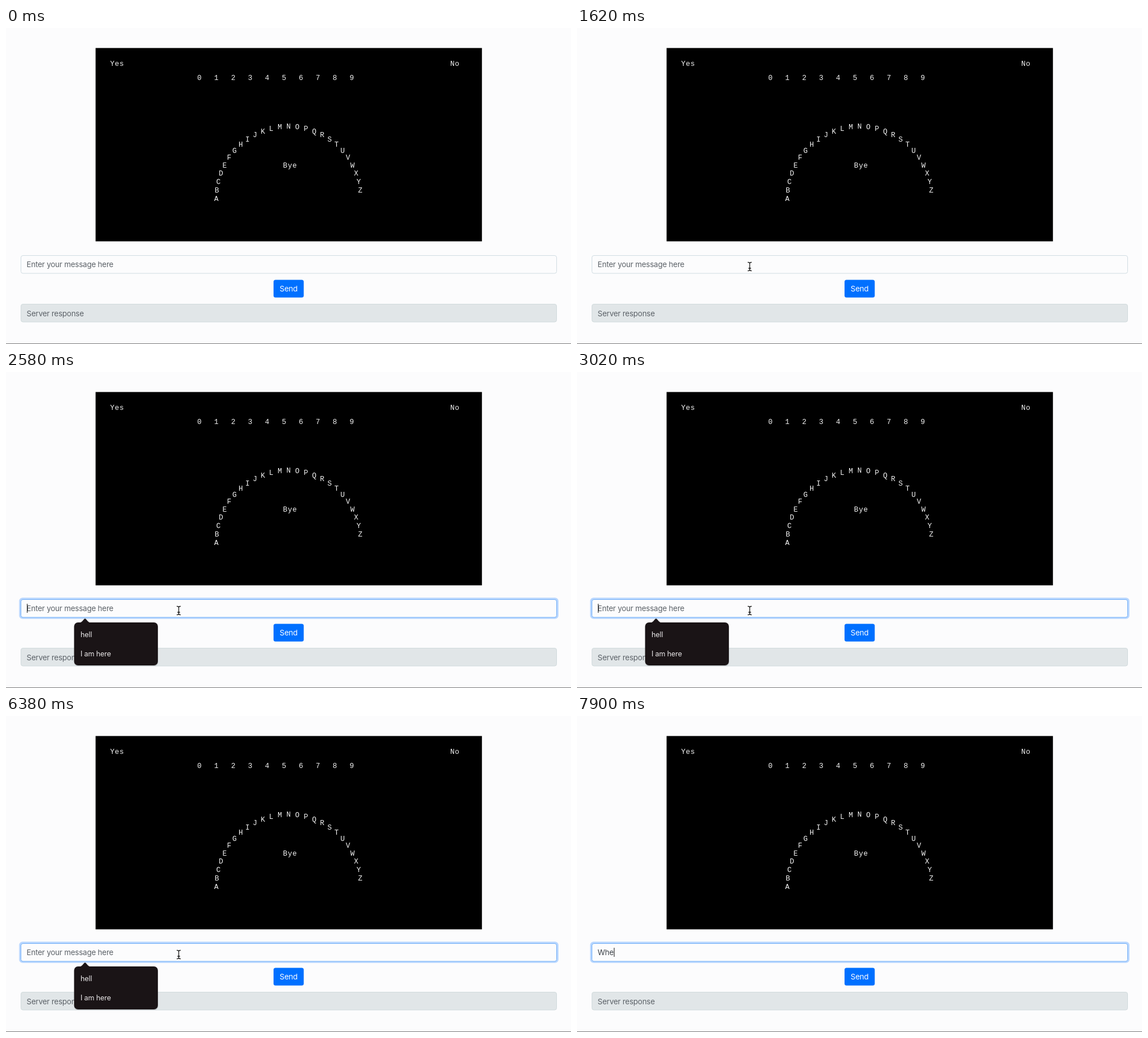
These frames come from a looping animation (1001x559 px, 8000 ms). An HTML page:

```html
<!DOCTYPE html>
<html lang="en">
<head>
<meta charset="utf-8">
<title>Spirit board</title>
<style>
  html, body { margin: 0; width: 100%; height: 100%; overflow: hidden; background: #fcfcfd; }
  svg { display: block; width: 1001px; height: 559px; }
  text { white-space: pre; }
  .ui { font: 13.4px Inter, sans-serif; letter-spacing: -.2px; fill: #5b6167; }
  .menu { font: 12.6px Inter, sans-serif; letter-spacing: -.15px; fill: #ebe9ea; }
  .board { font: 12.8px "Liberation Mono", monospace; letter-spacing: .66px; fill: #f4f4f4; }
  .mid { text-anchor: middle; letter-spacing: 0; }
</style>
</head>
<body>
<svg viewBox="0 0 1001 559">
  <rect width="1001" height="559" fill="#fcfcfd"/>
  <rect y="558" width="1001" height="1" fill="#777"/>
  <rect x="158.7" y="35.4" width="684.5" height="342" fill="#000"/>
  <g id="board" class="board">
    <text x="184.4" y="66.6">Yes</text>
    <text x="787" y="66.6">No</text>
    <text x="490.8" y="246.5">Bye</text>
  </g>

  <rect id="glow" x="23.2" y="399.2" width="955.6" height="37.6" rx="6" fill="#b9d7ff"/>
  <rect id="field" x="26.5" y="402.5" width="949" height="31.5" rx="3.5" fill="#fcfcfd"/>
  <text id="hint" class="ui" x="36.6" y="423.2">Enter your message here</text>
  <text id="typed" class="ui" x="36.6" y="423.2" style="fill:#3e444a"></text>
  <rect id="caret" y="410" width="1.1" height="16" fill="#222"/>

  <rect x="474" y="445.5" width="53.5" height="31.3" rx="3.6" fill="#0070ff"/>
  <text class="ui" x="484.8" y="465.9" style="fill:#fff">Send</text>
  <rect x="26.5" y="488.5" width="949" height="31.5" rx="3.5" fill="#e1e6e8" stroke="#d0dadc"/>
  <text class="ui" x="36.6" y="509.8">Server response</text>

  <g id="menu">
    <rect x="120" y="443" width="150" height="77.5" rx="8" fill="#000" opacity=".12"/>
    <path d="M130 443.5 Q133 443 135 441 L138.5 437 Q140 435.4 141.5 437 L145 441 Q147 443 150 443.5Z" fill="#1a1416"/>
    <rect x="120.7" y="443" width="148.3" height="76" rx="7" fill="#1a1416"/>
    <text class="menu" x="132" y="468.7">hell</text>
    <text class="menu" x="132" y="503.1">I am here</text>
  </g>

  <g id="mouse" fill="none">
    <g id="beam" stroke-linecap="round">
      <path id="beamLine" d="M-3 -7.5 Q0 -7.5 0 -5.5 Q0 -7.5 3 -7.5 M0 -5.5 V5.5 M-3 7.5 Q0 7.5 0 5.5 Q0 7.5 3 7.5 M-1.8 3 H1.8" stroke="#fff" stroke-width="2.8"/>
      <use href="#beamLine" style="stroke:#111"/>
      <path d="M-3 -7.5 Q0 -7.5 0 -5.5 Q0 -7.5 3 -7.5 M0 -5.5 V5.5 M-3 7.5 Q0 7.5 0 5.5 Q0 7.5 3 7.5 M-1.8 3 H1.8" stroke="#111" stroke-width="1.3"/>
    </g>
    <path id="arrow" d="M0 0 V14 L3.2 11 L5.3 16 L7.6 15 L5.5 10.2 H10Z" fill="#000" stroke="#fff"/>
  </g>
</svg>
<script>
const LOOP = 8000;
const FOCUS = 2400, MENU_ON = 2540, KEY_W = 6940, KEY_H = 7620, KEY_E = 7900;
const $ = id => document.getElementById(id);
const clamp = v => Math.max(0, Math.min(1, v));
const ramp = (t, from, to) => clamp((t - from) / (to - from));
const smooth = p => p * p * (3 - 2 * p);
const mix = (a, b, p) => a.map((v, i) => Math.round(v + (b[i] - v) * p));
const show = (el, on) => el.setAttribute("opacity", Number(on));

function addGlyph(char, x, y) {
  const el = document.createElementNS("http://www.w3.org/2000/svg", "text");
  el.setAttribute("x", x);
  el.setAttribute("y", y);
  el.setAttribute("class", "mid");
  el.textContent = char;
  $("board").append(el);
}

// Digits in a row, letters on a half circle
for (let i = 0; i < 10; i++) addGlyph(i, 342.5 + 30 * i, 92.3);
for (let i = 0; i < 26; i++) {
  const angle = Math.PI * i / 26;
  addGlyph(String.fromCharCode(65 + i), 500.6 - 128 * Math.cos(angle), 306.2 - 128 * Math.sin(angle));
}

function caretAlpha(t) {
  if (t < FOCUS) return 0;
  if (t < 4280) return 1 - ramp(t, 3580, 3720);
  if (t < 4960) return ramp(t, 4380, 4500);
  if (t < 5660) return 0;
  return t < 6380 || t >= KEY_W ? 1 : 0;
}

function drawMouse(t) {
  const p = 1 - Math.pow(1 - ramp(t, 170, 920), 2);
  const x = 322 - 16 * p, y = 566 - 144 * p;
  const inField = y < 434;
  $("mouse").setAttribute("transform", `translate(${x} ${y})`);
  show($("mouse"), t >= 170 && t < KEY_W);
  show($("beam"), inField);
  show($("arrow"), !inField);
}

function draw(t) {
  const focus = smooth(ramp(t, FOCUS, FOCUS + 150));
  show($("glow"), focus);
  $("field").setAttribute("stroke", `rgb(${mix([208, 220, 226], [112, 174, 246], focus)})`);

  const text = "Whe".slice(0, [KEY_W, KEY_H, KEY_E].filter(k => t >= k).length);
  if ($("typed").textContent !== text) $("typed").textContent = text;
  show($("hint"), !text);
  const end = text ? $("typed").getComputedTextLength() : 0;
  $("caret").setAttribute("x", 37 + end);
  show($("caret"), caretAlpha(t));

  show($("menu"), t < MENU_ON ? 0 : 1 - ramp(t, KEY_W + 20, KEY_W + 200));
  drawMouse(t);
}

function tick() {
  draw(performance.now() % LOOP);
  requestAnimationFrame(tick);
}
tick();
</script>
</body>
</html>
```
